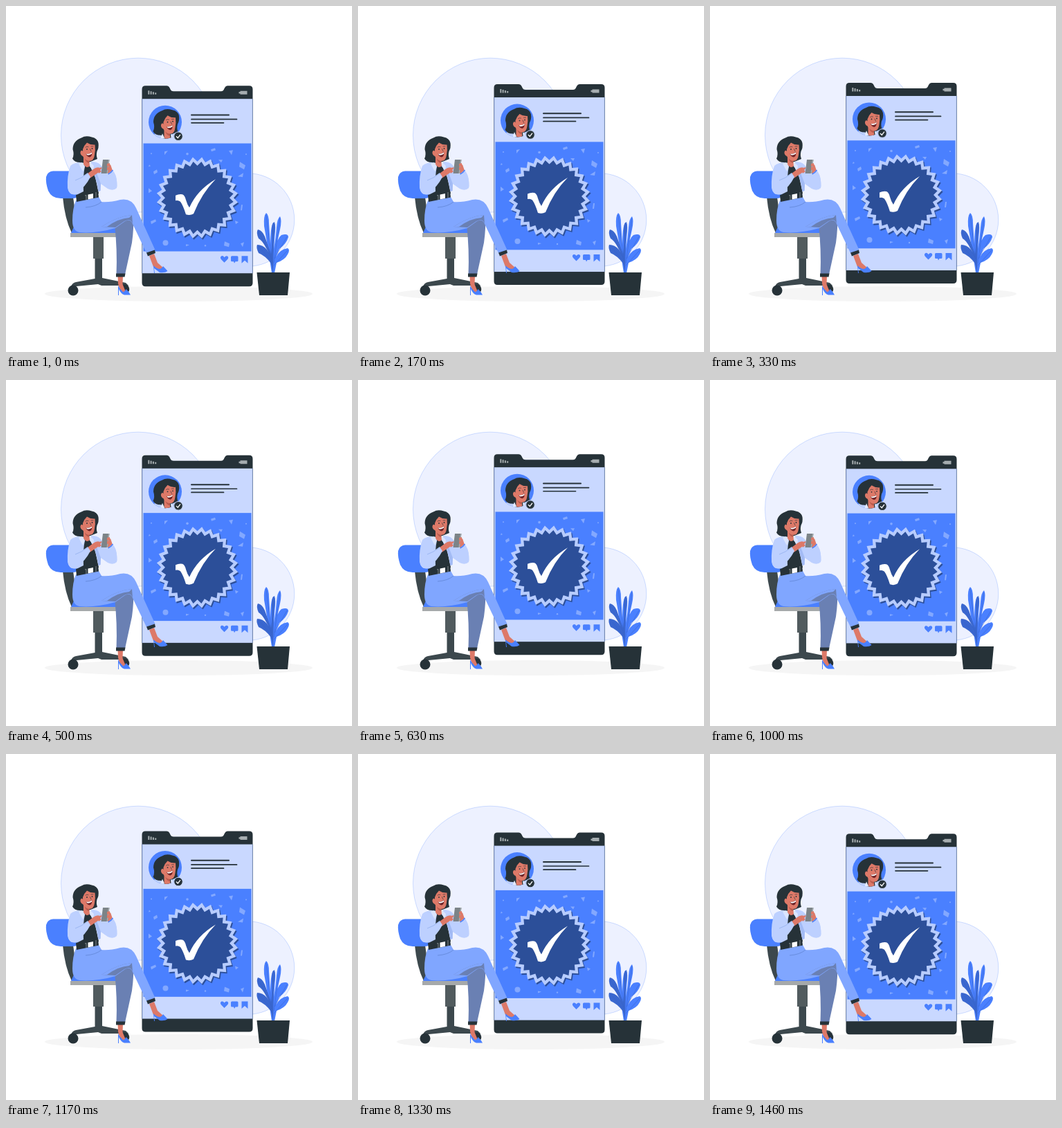
Animation of 500x500 px, one loop 1500 ms. Source, as an HTML page:

```html
<!DOCTYPE html>
<html lang="en">
<head>
<meta charset="utf-8">
<title>Verified profile</title>
<style>
  html, body { margin: 0; width: 100%; height: 100%; overflow: hidden; background: #fff; }
  svg { display: block; width: 100%; height: 100%; }
  .dark { fill: #263238; }
  .steel { fill: #3c484d; }
  .blue { fill: #4a80ff; }
  .deep { fill: #3a67cf; }
  .pale { fill: #c9d8ff; }
  .cloth { fill: #bdd0ff; }
  .skin { fill: #dd7968; }
  .shade { fill: #b95b4e; }
  .line { fill: none; stroke: #263238; stroke-linecap: round; }
</style>
</head>
<body>
<svg viewBox="0 0 500 500">
  <defs>
    <clipPath id="round"><circle cx="230" cy="167.500" r="24"/></clipPath>
    <g id="head">
      <path class="dark" d="M109 190.500Q115 186.500 124 189.500Q132 191 133.500 198Q134.500 205 131.500 210Q130 216 132 221L122 225Q113 228 107 226Q99 226 96 220.500Q99 215 96.500 207Q96.500 195 109 190.500Z"/>
      <path class="skin" d="M112 214L112 229Q117 236 121 231L120 221Z"/>
      <path class="shade" d="M113 219Q117 224 120 223V227Q115 226 113 219Z"/>
      <path class="skin" d="M111 207Q113 201 117 197.500Q122 201 128.500 200.500Q129.500 208 128 215Q127 224 120.500 224Q114 223 111 217Q107 215 107.500 211Q109 207 111 210Z"/>
      <path d="M115.500 213.500Q120.500 214.500 124 211Q125 217 121 218.500Q117 218 115.500 213.500Z" fill="#6d2428"/>
      <path d="M116 213.500Q120.500 214.500 124 211.500L124 213.500Q120 216.500 116.800 215Z" fill="#fff"/>
      <g class="dark"><circle cx="117" cy="207" r=".9"/><circle cx="124.500" cy="206" r=".9"/></g>
      <path class="line" d="M115 204Q117 202.500 119 203.500M123 202.800L126 202.800M121.500 206.500L123 210" stroke-width=".6"/>
    </g>
  </defs>

  <g fill="#edf1ff" stroke="#4a80ff" stroke-opacity=".5" stroke-width=".5">
    <circle cx="191" cy="186.700" r="111.500"/>
    <circle cx="349.500" cy="309" r="67.300"/>
  </g>
  <ellipse cx="249.500" cy="416" rx="193.500" ry="11" fill="#f5f5f5"/>

  <g id="phone">
    <path class="dark" d="M201.500 115H232Q235 115 236.500 118L238 121Q239 123 242 123H311Q313.500 123 314.500 121L316 118Q317.500 115 320 115H351.500Q356.500 115 356.500 120V400Q356.500 405 351.500 405H201.500Q196.500 405 196.500 400V120Q196.500 115 201.500 115Z"/>
    <rect class="pale" x="197" y="134" width="159" height="252"/>
    <path d="M196.800 134V386M356.300 134V386" stroke="#5f7fc4" stroke-width=".6"/>
    <path d="M206.300 122V127.500M209.600 123V127.500M212.900 124V127.500M216.200 125V127.500" stroke="#a6adb0" stroke-width="2"/>
    <path d="M338.500 122.500H348.500V127.500H338.500V126.300H336.500V123.800H338.500Z" fill="#a6adb0"/>

    <circle class="blue" cx="230" cy="167.500" r="24"/>
    <g clip-path="url(#round)">
      <path class="cloth" d="M212 195L215 184Q221 180 229 180L242 181Q249 184 251 195Z"/>
      <path class="dark" d="M227 181H238L240 195H227Z"/>
      <use href="#head" x="116.500" y="-39.500"/>
      <path d="M226 184L231 195H222ZM238 184L239 195H247Z" fill="#e4ebff"/>
    </g>
    <circle class="dark" cx="249" cy="188" r="6.300" stroke="#c9d8ff"/>
    <path d="M246 188L248.300 190.400L252 185.600" fill="none" stroke="#fff" stroke-width="1.300"/>
    <g class="line" stroke-width="1.700">
      <path d="M268 157.300H322" stroke-width="2"/>
      <path d="M268 163.400H333.500M268 168.600H314.500"/>
    </g>

    <rect class="blue" x="198.500" y="198.300" width="156" height="156"/>
    <g fill="#83a8ff">
      <path d="M229 210L234 209L229 215ZM296 207L302 205L303 208L297 210ZM322 209L328 208L326 215ZM338 225L346 230L344 236L337 232ZM213 239L218 236L219 240L214 243ZM206 263L211 267L206 270ZM335 246L343 241L342 247ZM340 287L342 287L341 295L339 295Z"/>
      <path d="M209 311L216 308L217 311L210 315ZM247 325L252 324L251 328ZM316 340L323 343L322 348L315 346ZM339 343L344 341L342 348ZM260 344L265 345L260 347ZM331 310L336 312L332 315ZM307 222L313 222L311 226ZM207 229L209 231L206 232Z"/>
      <circle cx="230.500" cy="342" r="4"/><circle cx="262" cy="213.500" r="1.800"/>
      <circle cx="210" cy="213" r="1"/><circle cx="288" cy="346" r="1.200"/><circle cx="347" cy="214" r="1"/>
    </g>
    <g transform="translate(276.500 277)">
      <path id="shadow" fill="#2c4f99" transform="translate(1.500 2)"/>
      <path id="ring" fill="#b7ccff"/>
      <path id="seal" fill="#2c4f99"/>
    </g>
    <path d="M245 273.500Q250 271 255 272Q258.500 273.500 260 280Q262 287 265 291Q276 266 303 250Q283 270 271 300Q266 303 260 301Q256 288 252 282.500Q249 280 245 281Z" fill="#fff"/>

    <g class="blue">
      <path d="M315.500 370.500L311 366Q308.500 362.500 311.500 361Q314 360.300 315.500 363Q317.500 360.300 320 361.200Q322.500 363 320 366Z"/>
      <path d="M326.500 361H334Q335.500 361 335.500 362.500V367.500Q335.500 369 334 369H331.500L330 371.500L329 369H326.500Q325 369 325 367.500V362.500Q325 361 326.500 361Z"/>
      <path d="M340.500 361H349.500V371.500L345 367.500L340.500 371.500Z"/>
    </g>
  </g>

  <g id="plant">
    <path class="blue" d="M384 386Q380 358 373 318Q372 303 376 299Q380 302 380 314Q381 330 382 345Q382 320 386 313Q390 312 389 325L387 351Q390 335 391 320Q392 307 396 304Q399 309 396 323L389 354Q391 336 398 331Q408 328 408 334Q405 344 395 351L390 363Q395 352 407 350Q411 352 407 359Q403 367 391 371L388 386Z"/>
    <path class="deep" d="M383 372Q375 361 365 357Q361 349 363 345Q371 345 377 352L380 357Q371 339 365 336Q361 327 364 323Q370 324 374 333L383 358Q385 343 384 325Q384 313 388 312Q390 319 387 334L386 386Z"/>
    <path d="M376 302L385 374M396 307L387 372M406 333L388 365M407 353L387 375M365 347L384 369M365 326L384 366" fill="none" stroke="#3460c6" stroke-width=".5"/>
    <path class="dark" d="M362.500 385H410L407 418H366Z"/>
  </g>

  <g id="chair">
    <path class="steel" d="M82 276H97L104 328H95Q85 308 82 276Z"/>
    <path class="blue" d="M68 238.500H94Q101 239 103 248L107 272Q104 278 95 278H79Q66 278 61 267Q57 255 58 247Q60 239 68 238.500Z"/>
    <path class="blue" d="M98 319H160V328H94Z"/>
    <rect x="93" y="328" width="68" height="6" fill="#a6a9aa"/>
    <path class="steel" d="M128.500 364H139V393L173 400L177 404H138L133 402L102 405H94Q96 400 101 399L128.500 394Z"/>
    <rect x="126" y="334" width="15" height="31" fill="#515b5e"/>
    <circle class="dark" cx="97" cy="411" r="7.500"/>
    <circle class="dark" cx="171.500" cy="409" r="6.800"/>
  </g>

  <g id="woman">
    <path class="skin" d="M161.500 390H169L168.500 402Q171 409 174 414L169 415Q163 408 162 401Z"/>
    <path class="blue" d="M162 404Q165 410 169.500 413.500Q173 411.500 173.500 409Q178 413 180 417.500H171Q166 416 163 409V418H162Z"/>
    <path d="M157 316L184 303Q185 320 182 342L172 388H159.500Q161 352 157 316Z" fill="#6a80b3"/>
    <path class="dark" d="M159 386.500H172.500L171.500 391.500H159Z"/>

    <path class="skin" d="M207 361L214 358L219 371L228 379L222 381L213 377Z"/>
    <path class="blue" d="M213 375Q218 380 223 380Q226 378.500 227 376Q231 380 233.500 383Q230 386 222 385L214 379L215 386H214Z"/>
    <path d="M101 281L134 276L138 283Q150 284 165 280Q181 277 188 292L215.500 352.500L203 357L183 315Q180 307 172 311L158 321Q130 329 106 327Q96 325 96 310Q96 293 101 281Z" fill="#80a6ff"/>
    <path d="M138 283Q130 290 115 291" fill="none" stroke="#587bc7" stroke-width=".6"/>
    <path d="M183 315Q181 306 171 311L158 320L138 319Q160 304 182 302Z" fill="#6a80b3"/>
    <path d="M138 319Q160 304 182 302L178 306Q162 307 146 319Z" fill="#80a6ff"/>
    <path class="dark" d="M203 356.500L215 352.500L216 357L205 361.500Z"/>

    <path class="dark" d="M111 229Q119 235 125 228L134 271L103 275Z"/>
    <path class="cloth" d="M110 226Q98 226 93 231Q88 245 89 263Q91 275 104 272L112 268Q111 245 114 232Z"/>
    <path class="cloth" d="M123 225Q132 225 136 229Q143 238 148 245L153 237L158 244Q162 257 160 263Q155 268 147 264L137 257L136.500 267L133.500 268Q130 246 123 235Z"/>
    <path d="M131 241L137 257L136.500 267L133.500 268Q131 252 128 243Z" fill="#a3bbf5"/>
    <path class="dark" d="M101 273L133 267L134 276.500L102 283Z"/>
    <path d="M118.500 272.500L126 271V278L118.500 279.500Z" fill="#fff"/>
    <path d="M114 274L116 273.500V281M130 269V277" fill="none" stroke="#a6adb0" stroke-width=".7"/>

    <use href="#head"/>
    <path d="M110 226L114 232L111 239L105 228ZM122 226L127 231L126 238L121 232Z" fill="#dbe5ff"/>

    <path class="skin" d="M118 242L126 236Q131 232 136 234L136 239L130 243L121 249Z"/>
    <path class="cloth" d="M96 256Q107 249 118 241L122 247Q115 261 101 272Q92 274 90 265Z"/>
    <path d="M100 252Q109 249 118 242" fill="none" stroke="#8faceb" stroke-width=".7"/>
    <path class="skin" d="M147 229Q151 227 152 232L154 238L149 244L145 239Z"/>
    <path d="M140 222H149.500L147 242H137.500Z" fill="#7c8488"/>
    <path d="M148 222H149.500L147 242H145.500Z" fill="#a6adb0"/>
    <path class="skin" d="M132 235L138 233Q139 235 136 237L138 239L134 242ZM146 228L150 227L150 231L146 232ZM146 233L151 232V236L146 237Z"/>
    <path class="cloth" d="M147 243L154 237Q159 243 160 252L158 264L148 263Z"/>
    <path d="M147.500 243Q151.500 241.500 154.500 237" fill="none" stroke="#4a80ff" stroke-width="1.500"/>
  </g>
</svg>
<script>
  const LOOP = 1500, RISE = 9.6, REST = 0.5, PHASE = 20, TEETH = 28;
  const byId = id => document.getElementById(id);

  // Zigzag outline with a valley at the top.
  function star(outer, inner) {
    let d = "";
    for (let i = 0; i < TEETH * 2; i++) {
      const a = i * Math.PI / TEETH - Math.PI / 2, r = i % 2 ? outer : inner;
      d += (i ? "L" : "M") + (r * Math.cos(a)).toFixed(2) + " " + (r * Math.sin(a)).toFixed(2);
    }
    return d + "Z";
  }

  byId("shadow").setAttribute("d", star(59, 52.5));
  byId("ring").setAttribute("d", star(59, 52.5));
  byId("seal").setAttribute("d", star(52.5, 46.5));

  const phone = byId("phone");
  function draw() {
    const p = (performance.now() + PHASE) % LOOP / LOOP;
    const lift = RISE * (1 - Math.abs(1 - 2 * p));
    phone.setAttribute("transform", `translate(0 ${(REST - lift).toFixed(3)})`);
    requestAnimationFrame(draw);
  }
  draw();
</script>
</body>
</html>
```
